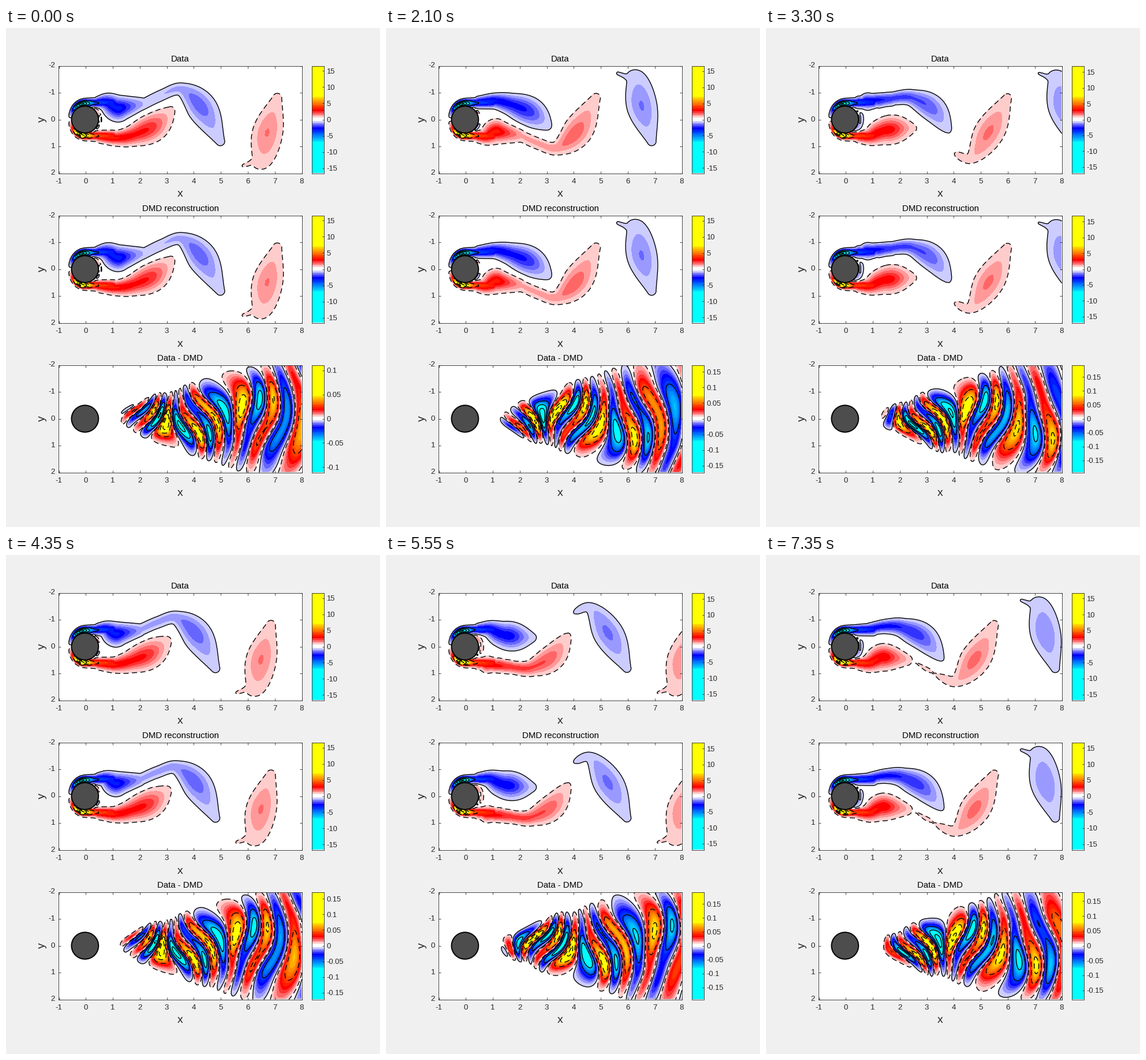
A matplotlib script for the animation above (7.5 s loop, 648 by 864 pixels).

```python
import numpy as np
import matplotlib.pyplot as plt
from matplotlib.animation import FuncAnimation
from matplotlib.colors import ListedColormap
from matplotlib.patches import Circle

W, H, DPI = 648, 864, 100
FRAMES, STEP = 50, 150
PERIOD = 30.3  # shedding period in frames
INK = "#262626"
plt.rcParams["font.family"] = "Liberation Sans"
plt.rcParams["axes.unicode_minus"] = False

xs, ys = np.linspace(-1, 8, 201), np.linspace(-2, 2, 89)
X, Y = np.meshgrid(xs, ys)
BASIS = np.stack([np.ones_like(X), X, Y, X**2 + Y**2], -1).reshape(-1, 4)


def ease(a, b, t):
    u = np.clip((t - a) / (b - a), 0, 1)
    return u * u * (3 - 2 * u)


def lerp(a, b, u):
    return a + (b - a) * u


def smooth(points, n=48):
    """Cubic curve through evenly spaced control points."""
    t = np.linspace(0, len(points) - 1, n)
    k = np.minimum(t.astype(int), len(points) - 2)
    u = (t - k)[:, None]
    m = np.gradient(points, axis=0)
    return ((1 + 2 * u) * (1 - u)**2 * points[k] + u * (1 - u)**2 * m[k]
            + u * u * (3 - 2 * u) * points[k + 1] - u * u * (1 - u) * m[k + 1])


def vortex(age):
    """Spine of one vortex, foot to tail: x, y, half-width, log strength."""
    young = min(age, 0)
    pinch = ease(36, 44, age)
    birth = 1 - ease(0, 10, age)

    cx = 1.35 + .055 * age + .0014 * age**2
    cy = -.45 + .2 * np.exp(-((age - 16) / 10)**2) + .03 * young
    core = np.array([cx, cy])
    foot = lerp(np.array([.5 + .105 * max(age - 15, 0),
                          -.65 + .35 * ease(25, 38, age)]),
                np.array([cx - .9, -1.72]), pinch)
    rise = .00075 * min(max(age, 0), 37)**2
    crest = np.array([cx - lerp(.2 + .55 * ease(0, 14, age), .2, pinch),
                      -.42 - rise + .03 * young])
    mid = (foot + crest) / 2 - [0, .08 * (1 - pinch)]
    tail = np.array([cx + lerp(.68, .35, pinch),
                     -.55 + 1.36 * ease(0, 25, age) + .025 * young])

    thin = .022 * young
    width = [lerp(.23, .06, pinch),
             lerp(.37 - .005 * age, .12, pinch) + 2 * thin,
             lerp(min(.5, .56 - .01 * age), .38, pinch) + thin,
             .56 - .1 * birth + thin,
             .17 + .1 * birth]

    peak = 1.2 + 1.75 * np.exp(-max(age, 0) / 28)
    head = .53 + 2.7 * (1 - ease(14, 36, age))
    power = [head, head**.9 * peak**.1, head**.6 * peak**.4, peak,
             .6 + .6 * birth - .15 * young]
    xy = np.array([foot, mid, crest, core, tail])
    return smooth(np.column_stack([xy, width, np.log(power)]))


def shear_layer():
    """Strong layer over the cylinder top, then straight downstream."""
    t = np.linspace(-1, 1, 48)
    arc = (np.minimum(t, 0) + 1) * np.pi / 2
    x = np.where(t < 0, -.57 * np.cos(arc), t)
    y = -.6 * np.sin(arc) - .03 * t.clip(0)
    width = .07 + .12 * ease(-1, 0, t) + .05 * t.clip(0)
    power = (1 + 10 * np.exp(-((t + .25) / .32)**2)
             + 3.6 * ease(-.5, 0, t) - 1.2 * t.clip(0))
    return np.column_stack([x, y, width, np.log(power)])


def rear_layer(phase):
    angle = np.linspace(np.pi / 3, -.25, 16)
    width = .03 + .11 * max(0, np.cos(2 * np.pi * (phase - 21) / PERIOD))
    return np.column_stack([.53 * np.cos(angle), .53 * np.sin(angle),
                            np.full(16, width), np.full(16, np.log(1.2))])


def ridge(points):
    """Envelope of Gaussians that reach 0.5 at each point's half-width."""
    x, y, h, la = points.T
    h, la = np.maximum(h, .03), np.maximum(la, np.log(.51))
    g = (la - np.log(.5)) / h**2
    coef = np.stack([la - g * (x * x + y * y), 2 * g * x, 2 * g * y, -g])
    return np.exp((BASIS @ coef).max(1)).reshape(X.shape)


def upper_wake(phase):
    phase %= PERIOD
    ages = [a for a in phase + PERIOD * np.array([-1, 0, 1]) if a > -10]
    return ridge(np.concatenate([shear_layer(), rear_layer(phase)]
                                + [vortex(a) for a in ages]))


def vorticity(i):
    # the lower row mirrors the upper one half a period later
    return upper_wake(i + PERIOD / 2)[::-1] - upper_wake(i)


def residual(i):
    """Short waves carried downstream in a widening wedge."""
    turn = 2 * np.pi * (i - 7) / PERIOD
    theta = 2 * np.pi * (X - 3) / 4.6 - turn
    near = np.exp(-(X - 3).clip(0) / 3.5)
    tilt = -near * np.cos(theta)
    bend = .13 - .75 * np.exp(-((X - 1.2) / 1.6)**2)
    u = X - tilt * Y / (1 + .3 * Y**2) + bend * Y**2 - 4
    n = np.pi * (2.268 * u - .089 * u**2)
    wave = (np.cos(n - 5 * turn)
            + (.35 + .4 * near) * np.sin(1.9 * Y) * np.cos(.8 * n - 4 * turn + 1)
            + .45 * near * np.cos(2.8 * Y) * np.cos(1.4 * n - 7 * turn))
    rise = 1 - np.exp(-((X - 1.1).clip(0) / .75)**2)
    width = .47 + .26 * (X - 2).clip(-.9)
    return (.44 * rise * np.exp(-.08 * (X - 3).clip(0))
            * np.exp(-(np.abs(Y) / width)**3) * wave)


def wake_range(i):
    return 16.8 - .2 * np.cos(4 * np.pi * i / PERIOD)


def residual_range(i):
    return .182 - .012 * np.cos(4 * np.pi * i / PERIOD) - .059 * np.exp(-i / 2)


def make_cmap():
    k = np.arange(33)
    fade, glow = (1 - k / 5).clip(0, 1), ((k - 5) / 9).clip(0, 1)
    mid, one = np.maximum(fade, glow), np.ones(33)
    warm = np.column_stack([one, mid, fade])
    cool = np.column_stack([fade, mid, one])
    return ListedColormap(np.vstack([cool[::-1], warm]))


CMAP = make_cmap()
LINES = np.array([.0303, .24, .4, .55, .7])

fig = plt.figure(figsize=(W / DPI, H / DPI), dpi=DPI, facecolor="#f0f0f0")


def label(x, y, s, size=9.6, color=INK, **kw):
    kw = {"ha": "center", "va": "center", **kw}
    fig.text(x / W, 1 - y / H, s, fontsize=size, color=color, **kw)


def box(left, top, width, height):
    ax = fig.add_axes([left / W, 1 - (top + height) / H, width / W, height / H])
    for side in ax.spines.values():
        side.set(color=INK, linewidth=.6)
        side.set_zorder(6)
    return ax


class Panel:
    def __init__(self, top, title, tick):
        self.tick, self.lines = tick, []
        ax = self.ax = box(91.5, top + .5, 421, 186)
        dx, dy = (xs[1] - xs[0]) / 2, (ys[1] - ys[0]) / 2
        look = dict(cmap=CMAP, vmin=-1, vmax=1, aspect="auto")
        self.img = ax.imshow(np.zeros_like(X), interpolation="bilinear",
                             interpolation_stage="data",
                             extent=(-1 - dx, 8 + dx, 2 + dy, -2 - dy), **look)
        ax.add_patch(Circle((-.03, 0), .5, fc="#4d4d4d", ec="k", lw=1.4, zorder=4))
        ax.set(xlim=(-1, 8), ylim=(2, -2), xticks=range(-1, 9), yticks=range(-2, 3))
        ax.tick_params(direction="in", length=3, width=.6, color=INK, top=True,
                       right=True, labelbottom=False, labelleft=False, zorder=6)
        for v in range(-1, 9):
            label(91.5 + (v + 1) * 421 / 9, top + 201, str(v))
        for v in range(-2, 3):
            label(85, top + .5 + (v + 2) * 46.5, str(v), ha="right")
        label(302, top - 11, title, 10.8, "black")
        label(302, top + 223, "x", 14)
        label(62, top + 93, "y", 14, rotation=90)

        self.bar = box(529.5, top + .5, 21, 186)
        self.bar.imshow(np.linspace(-1, 1, 66)[:, None], origin="lower",
                        interpolation="nearest", extent=(0, 1, -1, 1), **look)
        self.bar.set_xticks([])
        self.bar.yaxis.tick_right()
        self.bar.tick_params(direction="in", length=2.5, width=.6, pad=3.5,
                             color=INK, labelcolor=INK, labelsize=9.4)

    def show(self, data, top):
        self.img.set_data(data)
        for cs in self.lines:
            cs.remove()
        opts = dict(colors="k", linewidths=1, zorder=3)
        self.lines = [
            self.ax.contour(X, Y, data, -LINES[::-1], linestyles="solid", **opts),
            self.ax.contour(X, Y, data, LINES, linestyles=[(0, (6.5, 4))], **opts)]
        m = int(top / self.tick)
        vals = np.arange(-m, m + 1) * self.tick
        self.bar.set_yticks(vals / top, [f"{v:g}" for v in vals.round(3)])
        self.bar.set_ylim(-1, 1)


data_panel = Panel(65, "Data", 5)
model_panel = Panel(324, "DMD reconstruction", 5)
error_panel = Panel(583, "Data - DMD", .05)


def draw(i):
    flow = vorticity(i) / wake_range(i)
    for p in (data_panel, model_panel):
        p.show(flow, wake_range(i))
    error_panel.show(residual(i), residual_range(i))
    return []


anim = FuncAnimation(fig, draw, frames=FRAMES, interval=STEP, repeat=True)
plt.show()
```
